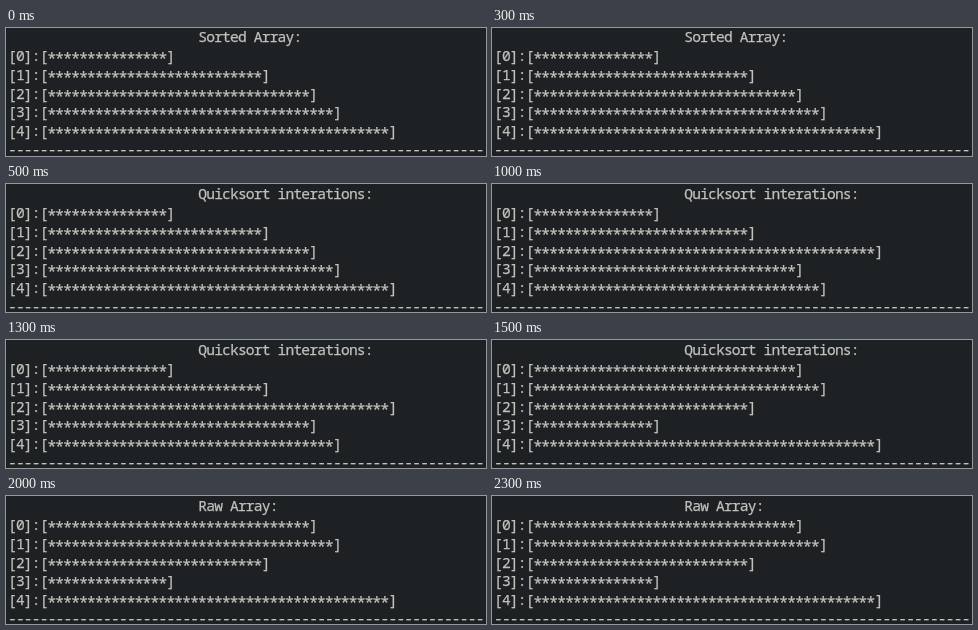
These frames come from a looping animation (480 px wide and 128 px high, 2.5 s). An HTML page:

```html
<!DOCTYPE html>
<html lang="en">
<head>
<meta charset="utf-8">
<title>Quicksort</title>
<style>
  html, body { margin: 0; width: 100%; height: 100%; overflow: hidden; background: #1d2124; }
  svg { display: block; width: 480px; height: 128px; }
  text {
    font: 14.6px "Noto Sans Mono", "DejaVu Sans Mono", monospace;
    letter-spacing: -0.83px;
    fill: #c2c1bb;
    stroke: #c2c1bb;
    stroke-width: 0.25px;
  }
  .stars { font-size: 16px; letter-spacing: -1.67px; }
  .step { visibility: hidden; animation: show 2.5s step-end infinite; }
  @keyframes show {
    0% { visibility: visible; }
    20%, 100% { visibility: hidden; }
  }
</style>
</head>
<body>
<svg viewBox="0 0 480 128"></svg>
<script>
  const NS = "http://www.w3.org/2000/svg";
  const LEFT = 2, CELL = 7.93, BASE = 15, LINE = 18.85;
  const svg = document.querySelector("svg");

  // title, bar lengths, vertical scroll of the screen
  const steps = [
    ["Sorted Array:", [15, 27, 33, 36, 43], -1],
    ["Quicksort interations:", [15, 27, 33, 36, 43], 0],
    ["Quicksort interations:", [15, 27, 43, 33, 36], 0],
    ["Quicksort interations:", [33, 36, 27, 15, 43], 0],
    ["Raw Array:", [33, 36, 27, 15, 43], 0],
  ];

  function add(parent, tag) {
    return parent.appendChild(document.createElementNS(NS, tag));
  }

  function print(parent, col, row, str) {
    const t = add(parent, "text");
    t.setAttribute("x", LEFT + col * CELL);
    t.setAttribute("y", BASE + row * LINE);
    t.textContent = str;
    return t;
  }

  function stars(parent, col, row, n) {
    const t = print(parent, col, row, "*".repeat(n));
    t.setAttribute("class", "stars");
    t.setAttribute("dx", -0.7);
    t.setAttribute("dy", 4);
  }

  steps.forEach(([title, values, scroll], i) => {
    const g = add(svg, "g");
    g.setAttribute("class", "step");
    g.setAttribute("transform", `translate(0 ${scroll})`);
    g.style.animationDelay = (i - steps.length) * 0.5 + "s";
    print(g, 24, 0, title);
    values.forEach((n, k) => {
      print(g, 0, k + 1, `[${k}]:[`);
      stars(g, 5, k + 1, n);
      print(g, 5 + n, k + 1, "]");
    });
    print(g, 0, 6, "-".repeat(60));
  });
</script>
</body>
</html>
```
